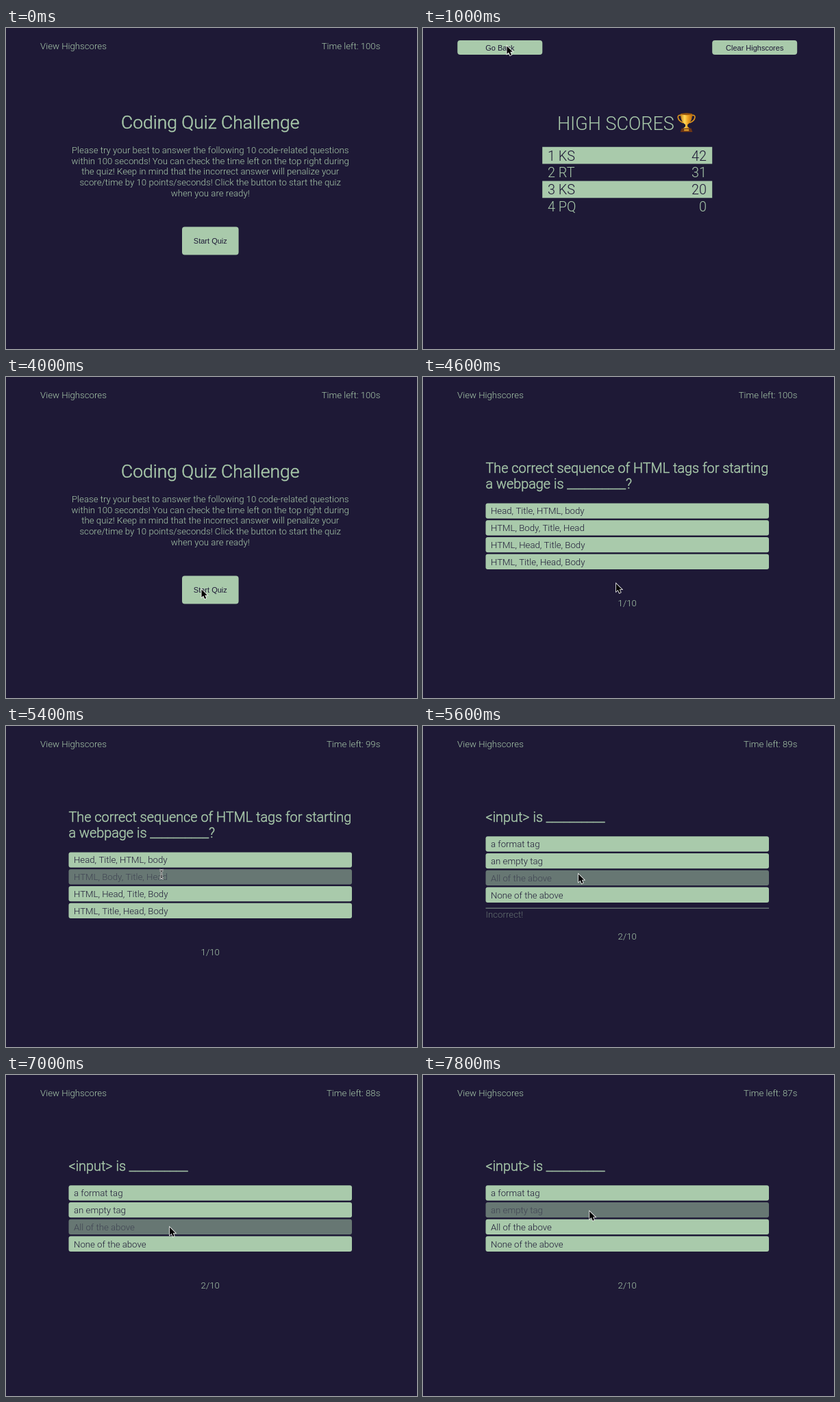
These frames come from a looping animation (600 px wide and 469 px high, 8 s). An HTML page with a canvas:

```html
<!DOCTYPE html>
<html lang="en">
<head>
<meta charset="utf-8">
<title>Coding Quiz Challenge</title>
<style>
  html, body { margin: 0; width: 100%; height: 100%; overflow: hidden; background: #1e1936; }
  canvas { display: block; }
</style>
</head>
<body>
<canvas id="stage" width="600" height="469"></canvas>
<script>
const ctx = document.getElementById('stage').getContext('2d');
const LOOP = 8000, STEP = 200;
const DARK = '#1e1936', GREEN = '#a9caab';
const CENTER = 298.2, LEFT = 91.5, WIDTH = 413.5;
const ROW = 24.8, LINE = 23.2;

const INTRO = [
  'Please try your best to answer the following 10 code-related questions',
  'within 100 seconds! You can check the time left on the top right during',
  'the quiz! Keep in mind that the incorrect answer will penalize your',
  'score/time by 10 points/seconds! Click the button to start the quiz',
  'when you are ready!'
];
const SCORES = [['1 KS', 42], ['2 RT', 31], ['3 KS', 20], ['4 PQ', 0]];
const QUESTIONS = [
  {
    lines: ['The correct sequence of HTML tags for starting', 'a webpage is __________?'],
    answers: ['Head, Title, HTML, body', 'HTML, Body, Title, Head', 'HTML, Head, Title, Body', 'HTML, Title, Head, Body']
  },
  {
    lines: ['<input> is __________'],
    answers: ['a format tag', 'an empty tag', 'All of the above', 'None of the above']
  }
];

// Pointer path: time, x, y
const PATH = [
  [200, 190, 110], [400, 142, 46], [600, 119, 13], [800, 122.5, 26.5],
  [3200, 122.5, 26.5], [3400, 138, 62], [3800, 279, 290], [4000, 285.5, 310.5],
  [4400, 285.5, 310.5], [4600, 282, 302], [5400, 227, 216.5], [5800, 227, 216.5],
  [6400, 231.5, 206.2], [7000, 239, 222.5], [7400, 239, 222.5], [7800, 243.2, 199.2]
];

const light = size => `300 ${size}px Roboto, sans-serif`;
const BODY = light(13.23), BUTTON = '11px "Liberation Sans", Arial, sans-serif';

function text(str, x, y, { font = BODY, color = GREEN, align = 'left', bold = 0 } = {}) {
  ctx.font = font;
  ctx.fillStyle = ctx.strokeStyle = color;
  ctx.textAlign = align;
  ctx.fillText(str, x, y);
  if (bold) {
    ctx.lineWidth = bold;
    ctx.lineJoin = 'round';
    ctx.strokeText(str, x, y);
  }
}

function box(x, y, w, h, radius = 0) {
  ctx.fillStyle = GREEN;
  ctx.beginPath();
  ctx.roundRect(x, y, w, h, radius);
  ctx.fill();
}

function button(label, x, y, w, h) {
  box(x, y, w, h, 4);
  text(label, x + w / 2, y + h / 2 + 4, { font: BUTTON, color: DARK, align: 'center' });
}

function polygon(points) {
  ctx.beginPath();
  points.forEach(([x, y]) => ctx.lineTo(x, y));
  ctx.closePath();
}

function header(seconds) {
  text('View Highscores', 50, 30.9);
  text(`Time left: ${seconds}s`, 546.4, 30.9, { align: 'right' });
}

function home() {
  header(100);
  text('Coding Quiz Challenge', CENTER, 146.8, { font: light(26.46), align: 'center', bold: 0.5 });
  INTRO.forEach((line, i) => text(line, CENTER, 182.8 + i * 15.7, { align: 'center' }));
  button('Start Quiz', 257, 290.4, 82.6, 41.2);
}

function trophy() {
  ctx.save();
  ctx.translate(384.6, 124);
  const gold = ctx.createLinearGradient(-9, 0, 9, 0);
  gold.addColorStop(0, '#c47a12');
  gold.addColorStop(0.35, '#ffd95a');
  gold.addColorStop(0.6, '#f0a526');
  gold.addColorStop(1, '#b5680c');
  ctx.strokeStyle = '#dc9420';
  ctx.lineWidth = 1.7;
  for (const side of [-1, 1]) {
    ctx.beginPath();
    ctx.moveTo(side * 7, 4);
    ctx.bezierCurveTo(side * 15, 1, side * 14, 11, side * 4.5, 14.5);
    ctx.stroke();
  }
  ctx.fillStyle = gold;
  ctx.beginPath();
  ctx.moveTo(-8.5, 1.5);
  ctx.bezierCurveTo(-8.5, 11, -5, 15, -1.6, 17);
  ctx.lineTo(-1.6, 20);
  ctx.lineTo(-5, 23);
  ctx.lineTo(5, 23);
  ctx.lineTo(1.6, 20);
  ctx.lineTo(1.6, 17);
  ctx.bezierCurveTo(5, 15, 8.5, 11, 8.5, 1.5);
  ctx.fill();
  ctx.fillStyle = '#9a560d';
  ctx.beginPath();
  ctx.ellipse(0, 1.8, 8.5, 1.5, 0, 0, 7);
  ctx.fill();
  ctx.fillStyle = '#6b3517';
  polygon([[-7, 22.5], [7, 22.5], [8.8, 28], [-8.8, 28]]);
  ctx.fill();
  ctx.fillStyle = '#d99a2b';
  ctx.fillRect(-3.5, 23.8, 7, 2.6);
  ctx.restore();
}

function highscores() {
  button('Go Back', 50.3, 18, 124, 21);
  button('Clear Highscores', 422.2, 18, 124, 21);
  text('HIGH SCORES', 196, 148.8, { font: light(27) });
  trophy();
  SCORES.forEach(([name, score], i) => {
    const y = 173.8 + i * ROW;
    const striped = i % 2 === 0;
    if (striped) box(174.2, y, 248, ROW);
    const style = { font: light(19.85), color: striped ? DARK : GREEN };
    text(name, 182, y + 19.7, style);
    text(score, 413.9, y + 19.7, { ...style, align: 'right' });
  });
}

function quiz(index, seconds, pointer, incorrect) {
  const { lines, answers } = QUESTIONS[index];
  const top = 138 + lines.length * LINE;
  header(seconds);
  lines.forEach((line, i) => text(line, LEFT, 139.9 + i * LINE, { font: light(19.85), bold: 0.45 }));

  let overText = false;
  answers.forEach((answer, i) => {
    const y = top + i * ROW;
    const offset = pointer.y + 2.5 - y;
    const hovered = offset > 0 && offset < 22.3;
    ctx.globalAlpha = hovered ? 0.53 : 1;
    box(LEFT, y, WIDTH, 22.3, 3);
    text(answer, 99, y + 16, { color: DARK });
    ctx.globalAlpha = 1;
    if (hovered) overText = pointer.x < 99 + ctx.measureText(answer).width;
  });

  if (incorrect) {
    ctx.globalAlpha = 0.5;
    box(LEFT, top + 104.2, WIDTH, 1.7);
    text('Incorrect!', LEFT, top + 118.5);
    ctx.globalAlpha = 1;
  }
  text(`${index + 1}/10`, CENTER, top + 150.9, { align: 'center' });
  return overText;
}

function pointerAt(t) {
  if (t < PATH[0][0]) return null;
  const next = PATH.findIndex(key => key[0] > t);
  if (next < 0) {
    const [, x, y] = PATH[PATH.length - 1];
    return { x, y };
  }
  const [t0, x0, y0] = PATH[next - 1], [t1, x1, y1] = PATH[next];
  const k = (t - t0) / (t1 - t0);
  return { x: x0 + (x1 - x0) * k, y: y0 + (y1 - y0) * k };
}

function arrow({ x, y }) {
  ctx.save();
  ctx.translate(x, y);
  polygon([[0, 0], [0, 11.4], [2.6, 9], [4.6, 13.6], [6.7, 12.7], [4.8, 8.2], [8.3, 8.2]]);
  ctx.lineJoin = 'miter';
  ctx.lineWidth = 1.6;
  ctx.strokeStyle = '#f4f4f4';
  ctx.stroke();
  ctx.fillStyle = '#000';
  ctx.fill();
  ctx.restore();
}

function textCursor({ x, y }) {
  ctx.save();
  ctx.translate(x, y);
  ctx.beginPath();
  for (const end of [-1, 1]) {
    ctx.moveTo(-3, end * 6);
    ctx.quadraticCurveTo(0, end * 6, 0, end * 4);
    ctx.quadraticCurveTo(0, end * 6, 3, end * 6);
  }
  ctx.moveTo(0, -5);
  ctx.lineTo(0, 5);
  ctx.moveTo(-2, 2.5);
  ctx.lineTo(2, 2.5);
  for (const [width, color] of [[2.4, '#e8eaea'], [0.9, '#222']]) {
    ctx.lineWidth = width;
    ctx.strokeStyle = color;
    ctx.stroke();
  }
  ctx.restore();
}

function secondsLeft(t) {
  const elapsed = Math.floor((t - 4200) / 1000);
  return 100 - elapsed - (t >= 5600 ? 10 : 0);
}

function draw(now) {
  const t = Math.floor((now % LOOP) / STEP) * STEP;
  const pointer = pointerAt(t);
  let overText = false;
  ctx.fillStyle = DARK;
  ctx.fillRect(0, 0, 600, 469);

  if (t >= 4200) {
    overText = quiz(t < 5600 ? 0 : 1, secondsLeft(t), pointer, t >= 5600 && t < 6600);
  } else if (t >= 800 && t < 3200) {
    highscores();
  } else {
    home();
  }
  if (pointer) (overText ? textCursor : arrow)(pointer);
}

const start = performance.now();
function tick() {
  draw(performance.now() - start);
  requestAnimationFrame(tick);
}
tick();
</script>
</body>
</html>
```
